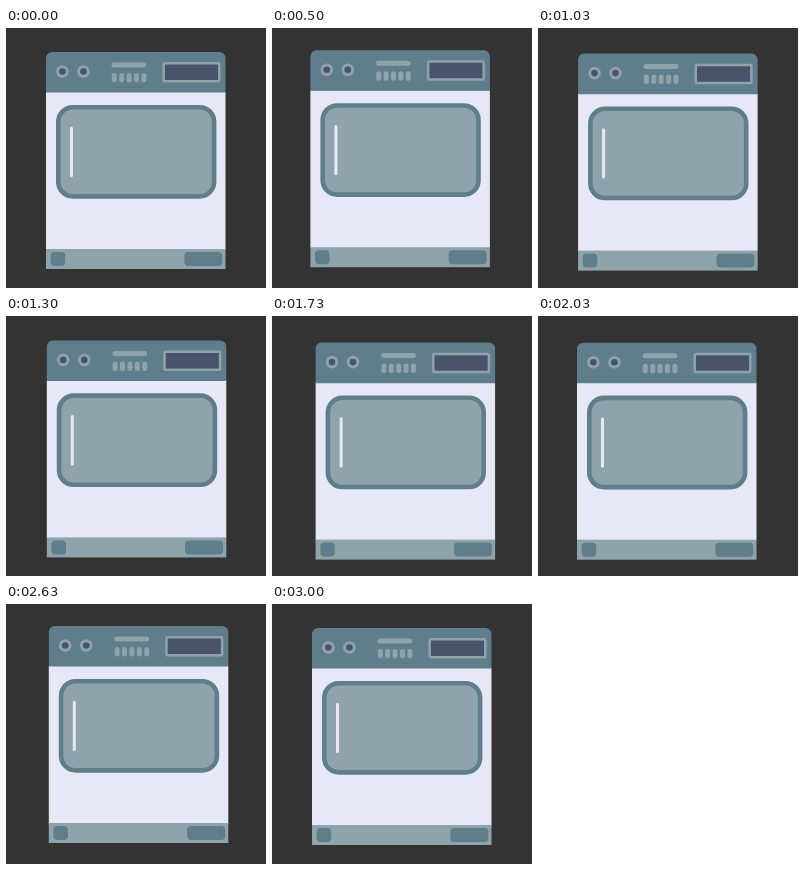
An HTML page for the animation above (4010 ms loop, 260 by 260 pixels).

```html
<!DOCTYPE html>
<html lang="en">
<head>
<meta charset="utf-8">
<title>Shaking dryer</title>
<style>
  html, body { margin: 0; height: 100%; overflow: hidden; background: #333; }
  svg { display: block; width: 100%; height: 100%; }
  .steel { fill: #5f7d8b; }
  .mist { fill: #8fa3ab; }
  .pale { fill: #e7e8f5; }
  .ink { fill: #49536c; }
</style>
</head>
<body>
<svg viewBox="0 0 260 260">
  <g id="dryer">
    <rect class="pale" x="40" y="64" width="179.5" height="158"/>
    <path class="steel" d="M40 64.6V30a6 6 0 0 1 6-6H213.5a6 6 0 0 1 6 6V64.6z"/>
    <g id="knobs"></g>
    <rect class="mist" x="105.5" y="34.5" width="34.8" height="5" rx="2.5"/>
    <g id="buttons" class="mist"></g>
    <rect class="ink" x="157.7" y="35.3" width="55.6" height="18" rx="1" stroke="#8fa3ab" stroke-width="2.5"/>
    <rect class="mist" x="52.3" y="79.2" width="155.8" height="89.2" rx="14.5" stroke="#5f7d8b" stroke-width="4.6"/>
    <rect class="pale" x="64" y="98.7" width="3" height="50.3" rx="1.5"/>
    <rect class="mist" x="40" y="221" width="179.5" height="20"/>
    <rect class="steel" x="44.7" y="224" width="14.5" height="14" rx="4"/>
    <rect class="steel" x="178.3" y="224" width="38" height="14" rx="4"/>
  </g>
</svg>
<script>
const $ = id => document.getElementById(id);
const LOOP = 4010, FPS = 30;

$('knobs').innerHTML = [56.4, 77.4].map(x =>
  `<circle class="mist" cx="${x}" cy="43.5" r="6.3"/><circle class="ink" cx="${x}" cy="43.5" r="3.3"/>`).join('');
$('buttons').innerHTML = [0, 1, 2, 3, 4].map(i =>
  `<rect x="${105.8 + i * 7.4}" y="45" width="5" height="9.5" rx="2.5"/>`).join('');

// Key poses: tick, x, y
const poses = [
  [14, 0, 0], [23, -.6, -2], [39, .8, .4], [52, 3.6, 2.6],
  [70, -.8, 2.8], [79, 2.8, -2], [90, 0, 0]
];

// Glide between poses with a wobble that fades to zero at each pose
function shake(tick) {
  const i = poses.findIndex(p => p[0] > tick);
  if (i < 1) return [0, 0];
  const a = poses[i - 1], b = poses[i], span = b[0] - a[0];
  const u = (tick - a[0]) / span;
  return [1, 2].map(n => {
    const swings = Math.round(span / (3 + n));
    return a[n] + (b[n] - a[n]) * u - 2.4 * Math.sin(Math.PI * swings * u);
  });
}

function draw() {
  const t = performance.now() % LOOP;
  const tick = Math.floor((t + 5) * FPS / 1000);
  $('dryer').setAttribute('transform', `translate(${shake(tick)})`);
  requestAnimationFrame(draw);
}
draw();
</script>
</body>
</html>
```
